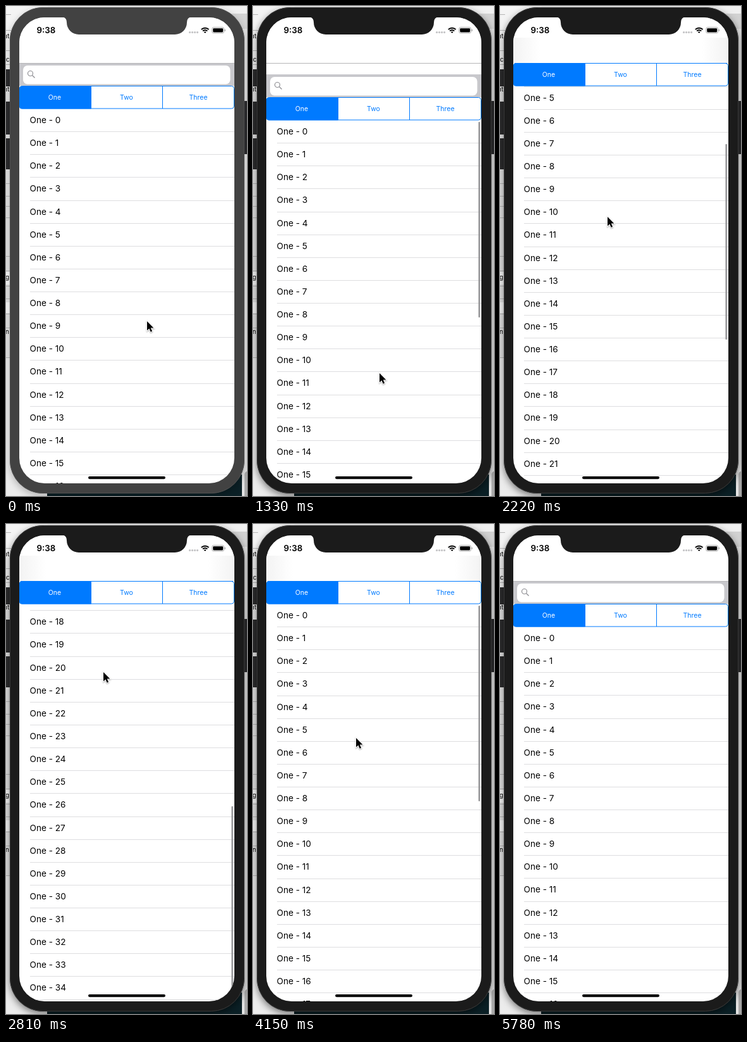
An HTML page with a canvas that plays this animation: 381x774 px, repeating every 5930 ms.

```html
<!DOCTYPE html>
<html lang="en">
<head>
<meta charset="utf-8">
<title>Scrolling list</title>
<style>
html, body { margin: 0; width: 100%; height: 100%; overflow: hidden; background: #e4e4e4; }
canvas { display: block; width: 381px; height: 774px; }
</style>
</head>
<body>
<canvas></canvas>
<script>
const LOOP = 5930, TICK = 148, ROW = 36.13, ROWS = 35;
const BLUE = '#007aff', FONT = 'Inter, "Liberation Sans", sans-serif';
const canvas = document.querySelector('canvas');
const c = canvas.getContext('2d');
const dpr = window.devicePixelRatio || 1;
canvas.width = 381 * dpr;
canvas.height = 774 * dpr;
c.scale(dpr, dpr);

// tick, header shift, list offset, pointer x, pointer y
const keys = [
  [0, 0, 0, 223, 498], [2, 0, 0, 200, 490], [6, 48, 0, 200, 578], [8, 52, 0, 200, 588],
  [9, 18, 0, 200, 580], [11, 0, 0, 200, 560], [12, 0, 0, 200, 553], [13, -36, 0, 196, 510],
  [14, -36, 60, 184, 420], [16, -36, 300, 156, 246], [18, -36, 570, 154, 236],
  [19, -36, 640, 154, 234], [20, -36, 590, 154, 290], [22, -36, 290, 155, 520],
  [24, -36, -21, 155, 687], [26, -36, 0, 157, 575], [28, -36, 0, 163, 338],
  [30, -2, 0, 165, 372], [32, 21, 0, 165, 412], [33, 21, 0, 165, 412],
  [34, 7, 0, 165, 440], [36, 0, 0, 165, 560], [39, 0, 0, 165, 790]
];

function pose(k) {
  const n = Math.max(1, keys.findIndex(key => key[0] >= k));
  const a = keys[n - 1], b = keys[n], p = (k - a[0]) / (b[0] - a[0]);
  return a.slice(1).map((v, i) => v + (b[i + 1] - v) * p);
}

function rect(color, x, y, w, h) {
  c.fillStyle = color;
  c.fillRect(x, y, w, h);
}

function round(color, x, y, w, h, r) {
  c.fillStyle = color;
  c.beginPath();
  c.roundRect(x, y, w, h, r);
  c.fill();
}

function text(str, x, y, size, color = '#000', align = 'left', weight = 400) {
  c.font = `${weight} ${size}px ${FONT}`;
  c.fillStyle = color;
  c.textAlign = align;
  c.fillText(str, x, y);
}

function line(color, width, points) {
  c.strokeStyle = color;
  c.lineWidth = width;
  c.beginPath();
  points.forEach(p => c.lineTo(...p));
  c.stroke();
}

function desktop() {
  rect('#e4e4e4', 0, 0, 381, 774);
  rect('#f4f4f4', 0, 0, 66, 100);
  rect('#f0f0f0', 66, 0, 315, 12);
  rect('#d2d2d2', 66, 12, 315, 24);
  rect('#ececec', 0, 555, 65, 219);
  for (const y of [13, 38, 70, 92, 280, 300, 316, 334, 395, 418, 442, 462, 486, 508, 555]) rect('#b5b5b5', 0, y, 8, 1);
  rect('#fafafa', 0, 420, 8, 20);
  rect('#fafafa', 0, 468, 8, 17);
  for (const [y, h] of [[100, 27], [151, 52], [209, 49]]) rect('#2c2c2e', 0, y, 8, h);
  rect('#2c2c2e', 375, 150, 6, 84);
  text('nt', -4, 51, 10);
  text('c', 0, 88, 10);
  text('nt', -4, 135, 10);
  text('g', -1, 432, 10);
  text('n', -1, 518, 10);
  rect('#0b2026', 65, 740, 308, 34);
  round('#aaa', 377, 735, 20, 50, 5);
}

function device(active) {
  const body = active ? '#1b1b1b' : '#424242';
  c.save();
  c.shadowColor = active ? 'rgba(0,0,0,.5)' : 'rgba(0,0,0,.25)';
  c.shadowBlur = 12 * dpr;
  c.shadowOffsetY = 4 * dpr;
  round(body, 6, 2, 371, 768, 53);
  c.restore();
  c.strokeStyle = active ? '#3a3a3a' : '#505050';
  c.lineWidth = 1;
  c.beginPath();
  c.roundRect(6.5, 2.5, 370, 767, 52);
  c.stroke();
  round('#fff', 21, 18, 340, 736, 40);
  return body;
}

function list(top, offset, barShown) {
  const bottom = top - offset;
  c.save();
  c.beginPath();
  c.rect(21, top, 340, 754 - top);
  c.clip();
  for (let i = 0; i < ROWS; i++) {
    const y = bottom + i * ROW;
    if (y < top - ROW || y > 754) continue;
    text('One - ' + i, 37.5, y + 23, 13.6);
    rect('#dedee0', 38, Math.round(y + ROW), 323, 1);
  }
  if (barShown) {
    const over = Math.min(0, offset);
    round('#8f8f91', 356.5, top + 3 + Math.max(0, offset) * .495, 2.3, 309 + over, 1.1);
  }
  c.restore();
}

function header(shift) {
  const y = 90 + shift;
  rect('#c8c8cc', 21, y, 340, 36);
  round('#fff', 27, y + 4, 327.5, 29.5, 7);
  c.strokeStyle = '#8e8e93';
  c.lineWidth = 1.2;
  c.beginPath();
  c.arc(38.5, y + 16.5, 4, 0, 7);
  c.stroke();
  line('#8e8e93', 1.3, [[41.5, y + 19.5], [45.5, y + 23.5]]);

  const s = y + 36;
  rect('#fff', 21, s, 340, 36);
  round(BLUE, 21, s + .5, 113.5, 36, [4, 0, 0, 4]);
  c.strokeStyle = BLUE;
  c.lineWidth = 1;
  c.beginPath();
  c.roundRect(21.5, s + .5, 339, 35.5, 4);
  c.stroke();
  rect(BLUE, 134, s, 1, 36);
  rect(BLUE, 247, s, 1, 36);
  ['One', 'Two', 'Three'].forEach((label, i) =>
    text(label, 77 + 113.5 * i, s + 22.3, 10.5, i ? BLUE : '#fff', 'center'));
}

function navBar(collapsed) {
  rect('#fff', 21, 18, 340, 72);
  if (collapsed) {
    for (const [x, dir] of [[21, 1], [361, -1]]) {
      const g = c.createLinearGradient(x, 0, x + 42 * dir, 0);
      g.addColorStop(0, '#f3f3f3');
      g.addColorStop(1, '#fff');
      c.fillStyle = g;
      c.fillRect(x, 50, 42 * dir, 40);
    }
  } else rect('#b6b6b8', 21, 90, 340, 1);
}

function status(body) {
  c.fillStyle = body;
  c.beginPath();
  c.moveTo(88, 17);
  c.lineTo(294, 17);
  c.quadraticCurveTo(286, 18, 286, 26);
  c.arcTo(286, 45, 266, 45, 19);
  c.arcTo(96, 45, 96, 26, 19);
  c.lineTo(96, 26);
  c.quadraticCurveTo(96, 18, 88, 17);
  c.fill();
  text('9:38', 48.5, 43, 13.3, '#000', 'left', 600);
  for (let i = 0; i < 4; i++) round('#c4c4c6', 289 + i * 4, 40, 3.2, 3.2, 1.6);
  c.strokeStyle = '#000';
  c.lineWidth = 2;
  for (const r of [1.5, 5, 8.3]) {
    c.beginPath();
    c.arc(314.7, 43, r, -Math.PI * .75, -Math.PI * .25);
    c.stroke();
  }
  c.strokeStyle = '#999';
  c.lineWidth = .8;
  c.beginPath();
  c.roundRect(325.7, 33.7, 19, 9.2, 2.6);
  c.stroke();
  round('#000', 327.2, 35.2, 16, 6.2, 1.3);
  round('#999', 345.7, 36.8, 1.2, 3, 1);
}

function pointer(x, y) {
  c.save();
  c.translate(x, y);
  c.shadowColor = 'rgba(0,0,0,.35)';
  c.shadowBlur = 2 * dpr;
  c.shadowOffsetY = dpr;
  const arrow = new Path2D('M0 0V14.5L3.4 11.4L5.7 16.8L8.1 15.8L5.8 10.5H10.4Z');
  c.strokeStyle = '#fff';
  c.lineWidth = 2;
  c.stroke(arrow);
  c.shadowColor = 'transparent';
  c.fillStyle = '#000';
  c.fill(arrow);
  c.restore();
}

function draw(now) {
  const k = Math.min(39, Math.floor((now % LOOP + 6) / TICK));
  const [shift, offset, x, y] = pose(k);
  desktop();
  const body = device(k > 0);
  c.save();
  c.beginPath();
  c.roundRect(21, 18, 340, 736, 40);
  c.clip();
  list(162 + shift, offset, k > 2 && k < 38);
  header(shift);
  navBar(shift <= -36);
  if (shift <= -36) rect(BLUE, 23, 90, 336, 1);
  status(body);
  round('#000', 130, 743, 122, 4.2, 2.1);
  c.restore();
  pointer(x, y);
}

const start = performance.now();
function frame() {
  draw(performance.now() - start);
  requestAnimationFrame(frame);
}
frame();
</script>
</body>
</html>
```
